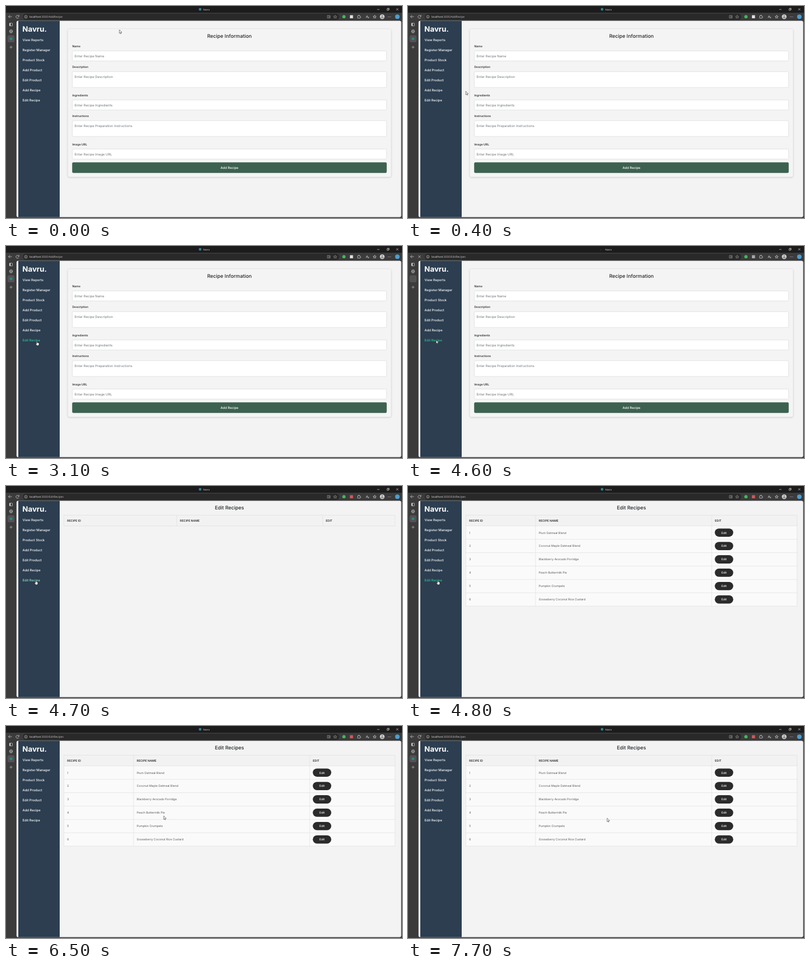
An HTML page with a canvas that plays this animation: 708x380 px, repeating every 8 s.

```html
<!DOCTYPE html>
<html lang="en">
<head>
<meta charset="utf-8">
<title>Recipe admin</title>
<style>
html, body { margin: 0; width: 100%; height: 100%; overflow: hidden; background: #3b3b3b; }
canvas { display: block; width: 708px; height: 380px; }
</style>
</head>
<body>
<canvas id="stage" width="708" height="380"></canvas>
<script>
const ctx = document.getElementById('stage').getContext('2d');
ctx.textRendering = 'geometricPrecision';

const LOOP = 8000;
const PX = 708 / 1920;
const UI = 'Inter, sans-serif';
const CHROME = '"Open Sans", sans-serif';
const BRAND = 'Navru';
const NAV = ['View Reports', 'Register Manager', 'Product Stock', 'Add Product',
  'Edit Product', 'Add Recipe', 'Edit Recipe'];
const FIELDS = [ // label, placeholder, top, height
  ['Name', 'Enter Recipe Name', 80.5, 18],
  ['Description', 'Enter Recipe Description', 117.7, 28.3],
  ['Ingredients', 'Enter Recipe Ingredients', 168.4, 18],
  ['Instructions', 'Enter Recipe Preparation Instructions', 205.6, 28.3],
  ['Image URL', 'Enter Recipe Image URL', 256.4, 18]
];
const RECIPES = ['Plum Oatmeal Blend', 'Coconut Maple Oatmeal Blend',
  'Blackberry Avocado Porridge', 'Peach Buttermilk Pie', 'Pumpkin Crumpets',
  'Gooseberry Coconut Rice Custard'];
const POINTER = [ // time, x, y, shape
  [0, 202.7, 42.8, 'arrow'], [400, 103.3, 152.8, 'arrow'], [2400, 55.5, 176, 'arrow'],
  [2500, 53.5, 172, 'hand'], [2700, 52.8, 170.6, 'hand'], [3900, 50, 168.4, 'hand'],
  [4500, 50.3, 168.8, 'arrow'], [4700, 50.7, 169, 'hand'], [5700, 132.4, 167.6, 'arrow'],
  [5800, 196, 166, 'arrow'], [5900, 240, 163.5, 'arrow'], [6000, 263, 162, 'arrow'],
  [6100, 273.5, 161.2, 'arrow'], [6500, 282, 161.2, 'arrow'], [7000, 321.8, 165.4, 'arrow'],
  [7300, 358, 165, 'arrow'], [7500, 352.5, 165.7, 'arrow'], [7700, 356, 165.2, 'arrow']
];
const SHAPES = {
  arrow: [[0, 0], [0, 17], [4, 13.4], [6.5, 19], [9, 18], [6.6, 12.4], [12, 12]],
  hand: [[5, 1], [6.5, 0], [8, 1], [8, 7], [16, 9.5], [17, 11], [16.5, 16], [14.5, 21.5],
    [7, 21.5], [.5, 13.5], [1, 11.8], [2.5, 11.8], [5, 14]]
};

const clamp = v => Math.max(0, Math.min(1, v));

function text(str, x, y, size, color, weight = 400, align = 'left', family = UI) {
  ctx.font = `${weight} ${size}px ${family}`;
  ctx.textAlign = align;
  ctx.fillStyle = color;
  ctx.fillText(str, x, y);
}

function rect(x, y, w, h, color) {
  ctx.fillStyle = color;
  ctx.fillRect(x, y, w, h);
}

function box(x, y, w, h, r, fill, stroke, width = .6) {
  ctx.beginPath();
  ctx.roundRect(x, y, w, h, r);
  if (fill) { ctx.fillStyle = fill; ctx.fill(); }
  if (stroke) { ctx.strokeStyle = stroke; ctx.lineWidth = width; ctx.stroke(); }
}

function disc(x, y, r, fill, stroke) {
  box(x - r, y - r, 2 * r, 2 * r, r, fill, stroke, .65);
}

function path(d, x = 0, y = 0, color = '#d6d6d6', width = .7) {
  ctx.save();
  ctx.translate(x, y);
  ctx.strokeStyle = color;
  ctx.lineWidth = width;
  ctx.stroke(new Path2D(d));
  ctx.restore();
}

function drawTitleBar(loading) {
  rect(0, 0, 708, 12, '#1c1c1c');
  if (loading) disc(344.5, 7, .4, '#aaa');
  else disc(347, 6, 2.4, '#32808c');
  text(BRAND, 352.5, 7.6, 4.2, '#e8e8e8', 400, 'left', CHROME);
  path('M-2 0H2', 665.6, 6.2);
  path('M-1.8-1H1V1.8H-1.8ZM-.8-1V-2H2V.8H1', 683, 6);
  path('M-1.8-1.8L1.8 1.8M1.8-1.8L-1.8 1.8', 699.6, 6);
}

function drawToolbar(url, loading, extension) {
  path('M3-.1H-3M-.3-2.8L-3-.1L-.3 2.6', 7.5, 19.2);
  if (loading) path('M-2.2-2.2L2.2 2.2M2.2-2.2L-2.2 2.2', 20.5, 19.2);
  else path('M2.6-.5A2.7 2.7 0 1 0 2.4 1.4M2.7-2.9V-.6H.5', 20.5, 19.2);

  box(30, 13.8, 566, 11, 5.5, '#292929');
  disc(35.5, 19.3, 2.5, null, '#cfcfcf');
  path('M0-.4V1.4M0-1.5V-.9', 35.5, 19.3);
  const host = 'localhost';
  text(host, 42, 21, 4.9, '#f0f0f0', 400, 'left', CHROME);
  text(url, 42 + ctx.measureText(host).width, 21, 4.9, '#c4c4c4', 400, 'left', CHROME);

  const gray = '#a9a9a9';
  path('M-2.5-2.3H2.5V2.3H-2.5ZM0-2.3V2.3M0 0H2.5', 577, 19.3, gray, .6);
  path('M0-2.8L.8-.9L2.8-.7L1.3.6L1.8 2.6L0 1.5L-1.8 2.6L-1.3.6L-2.8-.7L-.8-.9Z', 588.5, 19.3, gray, .6);
  disc(604.2, 19.2, 2.9, '#43b85c');
  rect(614.9, 16.5, 5.5, 5.5, extension);
  path('M-2.3-1.5H-.8A.9.9 0 1 1 .8-1.5H2V0A.9.9 0 1 1 2 1.5V2.6H-2.3Z', 631, 19.2);
  path('M-2.4 2L-.4-2L1.2 1.6M-1.6.7H.4M1 2.2H2.4V.2', 646, 19.2);
  path('M0-2.7L.8-.8L2.8-.6L1.2.7L1.7 2.6L0 1.5L-1.7 2.6L-1.2.7L-2.8-.6L-.8-.8Z', 659.2, 19.2);
  disc(672.6, 19.2, 4.2, '#d2d2d2');
  disc(672.6, 17.8, 1.4, '#858585');
  box(670.1, 19.8, 5, 2.2, 1.1, '#858585');
  for (const x of [683.4, 685.6, 687.8]) disc(x, 19.3, .5, '#d6d6d6');
  disc(699.7, 19.2, 4, '#4a9fd4');
}

function drawTabStrip(loading) {
  box(6.3, 30.7, 5.2, 5, .8, null, '#d6d6d6', .7);
  rect(6.3, 30.7, 1.9, 5, '#d6d6d6');
  disc(9, 45.5, 2.8, null, '#d0d0d0');
  path('M-2.8 0H2.8M0-2.8C-1.8-1-1.8 1 0 2.8C1.8 1 1.8-1 0-2.8', 9, 45.5, '#d0d0d0', .5);
  box(3.2, 53, 11.4, 11.6, 2, '#515151', '#656565', .5);
  if (!loading) disc(9, 58.8, 2.5, '#32808c');
  path('M-2.6 0H2.6M0-2.6V2.6', 9, 73.8, '#bcbcbc');
}

function drawNav(hover) {
  rect(22, 26, 74, 353, '#2c3e50');
  text(BRAND + '.', 29.3, 45.9, 36 * PX, '#fff', 700);
  const mix = (a, b) => Math.round(a + (b - a) * hover);
  const active = `rgb(${mix(255, 44)},${mix(255, 198)},${mix(255, 148)})`;
  NAV.forEach((item, i) => {
    text(item, 29.5, 62.6 + i * 18.05, 16 * PX, i === 6 ? active : '#fff', 500);
  });
}

function drawForm() {
  ctx.save();
  ctx.shadowColor = 'rgba(0,0,0,.2)';
  ctx.shadowBlur = 3.5;
  ctx.shadowOffsetY = .7;
  box(110.8, 41.3, 577.6, 265.2, 3, '#f4f4f4');
  ctx.restore();
  text('Recipe Information', 399.5, 57.1, 24 * PX, '#212529', 500, 'center');
  for (const [label, hint, y, h] of FIELDS) {
    text(label, 118.4, y - 6.5, 14 * PX, '#333', 600);
    box(118.5, y, 562, h, 1.8, '#fff', '#d0d3d6');
    text(hint, 122.5, y + 11.2, 16 * PX, '#6f757b');
  }
  box(118.3, 280.2, 562.4, 19, 2.2, '#3d6150');
  text('Add Recipe', 399.5, 292, 16 * PX, '#fff', 500, 'center');
}

function drawTable(rows) {
  const [nameX, editX] = rows.length ? [228, 543] : [305.3, 566.2];
  const rowY = i => 71.6 + i * 23.94;
  const bottom = rowY(rows.length);
  const line = '#dcdcdc';

  text('Edit Recipes', 399.5, 42, 24 * PX, '#212529', 500, 'center');
  rect(103.3, 52.2, 592.4, 19.4, '#f2f2f2');
  rect(103.3, 71.6, 592.4, bottom - 71.6, '#fafafa');
  for (const y of [52.2, ...Array.from({ length: rows.length + 1 }, (_, i) => rowY(i))])
    rect(103, y - .3, 593, .6, line);
  for (const x of [103.3, nameX, editX, 695.7])
    rect(x - .3, 52.2, .6, bottom - 52.2, line);

  const head = (str, x) => text(str, x, 63.8, 14 * PX, '#2b2b2b', 600);
  head('RECIPE ID', 109.3);
  head('RECIPE NAME', nameX + 5.8);
  head('EDIT', editX + 5.6);
  rows.forEach((name, i) => {
    const mid = rowY(i) + 12;
    text(i + 1, 109.3, mid + 1.9, 14 * PX, '#555');
    text(name, nameX + 5.8, mid + 1.9, 14 * PX, '#555');
    box(548.5, mid - 7.4, 33, 14.8, 7.4, '#2b2b2b');
    text('Edit', 565, mid + 1.9, 14 * PX, '#fff', 500, 'center');
  });
}

function drawPointer([, x, y, shape]) {
  ctx.save();
  ctx.translate(x, y);
  ctx.scale(PX, PX);
  ctx.beginPath();
  SHAPES[shape].forEach(p => ctx.lineTo(...p));
  ctx.closePath();
  ctx.fillStyle = '#fff';
  ctx.fill();
  ctx.lineJoin = 'round';
  ctx.strokeStyle = '#111';
  ctx.lineWidth = 1.4;
  ctx.stroke();
  ctx.restore();
}

function hoverAt(t) {
  if (t < 4700) return clamp((t - 2400) / 300);
  if (t < 5700) return clamp((t - 4700) / 200 + .5);
  return clamp(1 - (t - 5700) / 300);
}

function draw(time) {
  const t = Math.floor(time % LOOP / 100) * 100;
  const loading = t >= 4500 && t < 4700;
  const url = t < 4500 ? ':3000/AddRecipe' : ':3000/EditRecipes';
  const extension = loading ? '#a8a8a8' : t < 4700 ? '#e6dede' : '#d95555';

  rect(0, 0, 708, 380, '#3b3b3b');
  drawTitleBar(loading);
  drawToolbar(url, loading, extension);
  drawTabStrip(loading);

  ctx.save();
  ctx.beginPath();
  ctx.roundRect(18.8, 26.4, 687.8, 352.2, 3);
  ctx.clip();
  rect(18, 26, 690, 354, '#f3f3f3');
  drawNav(hoverAt(t));
  if (t < 4700) drawForm();
  else drawTable(t < 4800 ? [] : RECIPES);
  ctx.restore();

  drawPointer(POINTER.findLast(key => key[0] <= t));
}

const start = performance.now();
function tick() {
  draw(performance.now() - start);
  requestAnimationFrame(tick);
}
tick();
</script>
</body>
</html>
```
